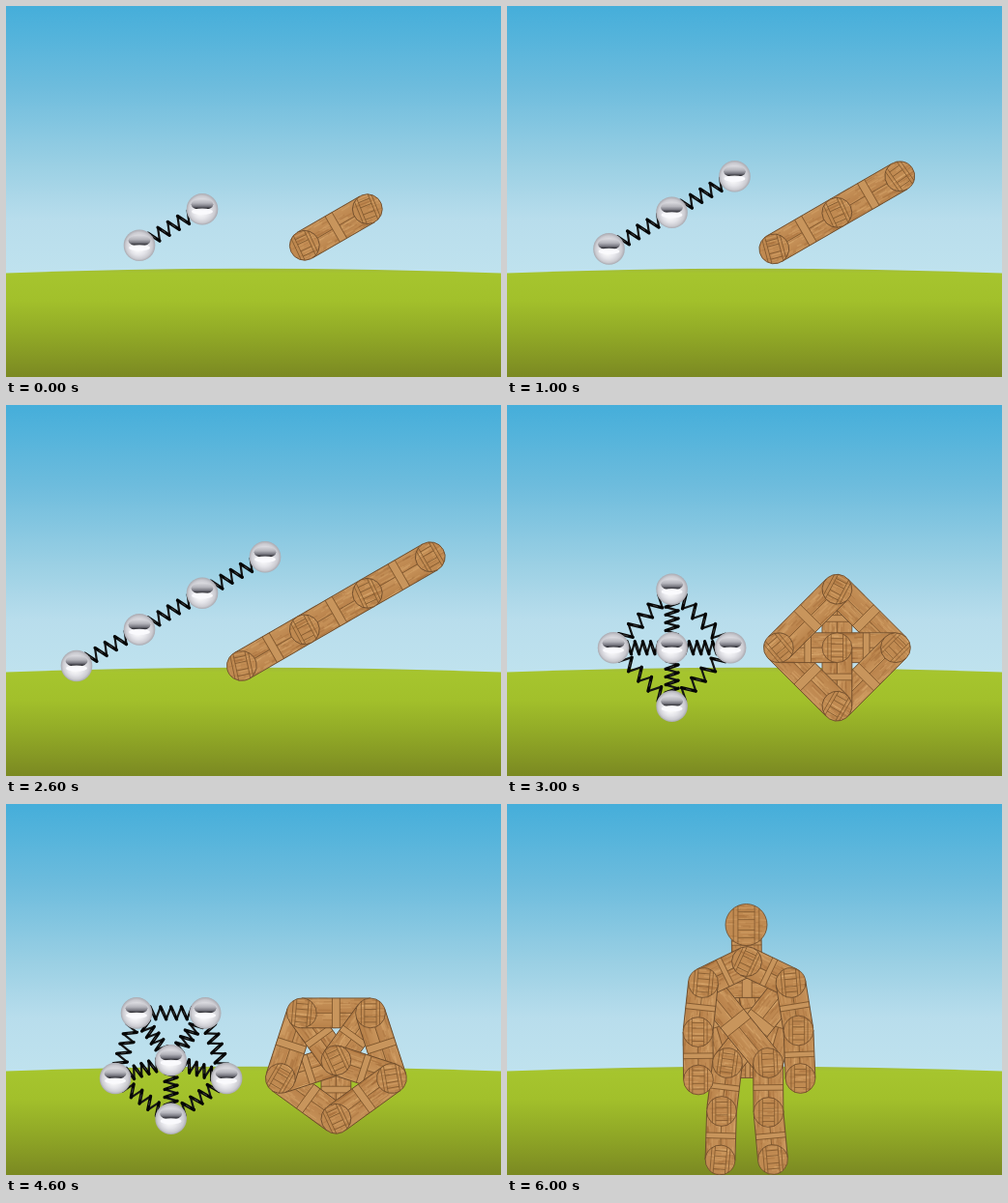
These frames come from a looping animation (512 by 384 pixels, 7 s). An HTML page with a canvas:

```html
<!DOCTYPE html>
<html lang="en">
<head>
<meta charset="utf-8">
<title>Springs and planks</title>
<style>
html, body { margin: 0; overflow: hidden; background: #b9deec; }
canvas { display: block; }
</style>
</head>
<body>
<canvas id="stage" width="512" height="384"></canvas>
<script>
const ctx = document.getElementById('stage').getContext('2d');
const RAD = Math.PI / 180, EDGE = '#6b4a2a', SEAM = '#82592f';

function seeded(seed) {
  return () => (seed = (seed * 16807) % 2147483647) / 2147483647;
}

function fade(gradient, ...colors) {
  for (const [at, color] of colors) gradient.addColorStop(at, color);
  return gradient;
}

function local(x, y, angle, draw) {
  ctx.save();
  ctx.translate(x, y);
  ctx.rotate(angle);
  draw();
  ctx.restore();
}

function strokeLine(x1, y1, x2, y2, color = SEAM, width = 0.9) {
  ctx.strokeStyle = color;
  ctx.lineWidth = width;
  ctx.beginPath();
  ctx.moveTo(x1, y1);
  ctx.lineTo(x2, y2);
  ctx.stroke();
}

function disc(r, fill, squash = 1, y = 0) {
  ctx.fillStyle = fill;
  ctx.beginPath();
  ctx.ellipse(0, y, r, r * squash, 0, 0, 7);
  ctx.fill();
}

// Streaks running along x
function grain(x, y, w, h, seed) {
  const random = seeded(seed);
  for (let i = 0; i < w * h / 30; i++) {
    const gx = x + random() * w, gy = y + random() * h, len = 5 + random() * 14;
    const color = random() < 0.5 ? 'rgba(140,88,42,.22)' : 'rgba(226,180,120,.3)';
    strokeLine(gx, gy, Math.min(x + w, gx + len), gy + random() - 0.5, color, 0.8 + random());
  }
}

function drawBackground() {
  ctx.fillStyle = fade(ctx.createLinearGradient(0, 0, 0, 276),
    [0, '#45aeda'], [0.3, '#6dbcdd'], [0.6, '#9bd0e4'], [0.8, '#b8ddec'], [1, '#bfe2ee']);
  ctx.fillRect(0, 0, 512, 384);
  ctx.fillStyle = fade(ctx.createLinearGradient(0, 271, 0, 384),
    [0, '#9fb83a'], [0.05, '#a6c52e'], [0.3, '#a2c02b'], [0.65, '#8fa626'], [1, '#7b8922']);
  ctx.beginPath();
  ctx.moveTo(0, 276.5);
  ctx.quadraticCurveTo(250, 267, 512, 276.5);
  ctx.lineTo(512, 384);
  ctx.lineTo(0, 384);
  ctx.fill();
}

function drawBall([x, y]) {
  const r = 16.3;
  local(x, y, 0, () => {
    disc(r, fade(ctx.createRadialGradient(-2, 2, 2, 0, 0, r),
      [0, '#fff'], [0.5, '#e4e4e9'], [0.82, '#cbcbd1'], [1, '#a9a9b0']));
    disc(11.5, fade(ctx.createLinearGradient(0, -11, 0, 1),
      [0, '#dcdce1'], [0.4, '#b4b4bb'], [0.68, '#777780'], [0.88, '#26262c'], [1, '#4a4a52']), 0.52, -5);
    disc(11, 'rgba(250,250,253,.95)', 0.28, 2.5);
  });
}

// A zigzag with heavy down strokes and lighter returns
function drawSpring([x1, y1], [x2, y2]) {
  const length = Math.hypot(x2 - x1, y2 - y1), start = 14, turns = 4;
  const pitch = (length - 2 * start) / turns, height = 6.5;
  local(x1, y1, Math.atan2(y2 - y1, x2 - x1), () => {
    ctx.lineCap = 'round';
    for (let i = 0; i < turns; i++) {
      const left = start + i * pitch, middle = left + pitch * 0.55;
      strokeLine(middle, height, left + pitch, -height, '#151515', 2.2);
      strokeLine(left, -height, middle, height, '#050505', 3.3);
      strokeLine(left + pitch * 0.2, -2, left + pitch * 0.36, 2, '#666', 0.6);
    }
  });
}

function drawPlank([x1, y1], [x2, y2], seed) {
  const length = Math.hypot(x2 - x1, y2 - y1), mid = length / 2, h = 15.4;
  const band = length * 0.055;
  local(x1, y1, Math.atan2(y2 - y1, x2 - x1), () => {
    ctx.fillStyle = fade(ctx.createLinearGradient(0, -h, 0, h),
      [0, '#c69259'], [0.48, '#ba834c'], [0.52, '#c8945b'], [1, '#b88149']);
    ctx.fillRect(0, -h, length, 2 * h);
    grain(0, -h, length, 2 * h, seed);
    strokeLine(0, 0, length, 0);
    ctx.fillStyle = '#c8955c';
    ctx.fillRect(mid - band, -h, 2 * band, 2 * h);
    for (const x of [mid - band, mid + band]) strokeLine(x, -h, x, h);
    for (const y of [-h, h]) strokeLine(0, y, length, y, EDGE);
  });
}

function drawJoint([x, y, tilt, r = 15.4], seed) {
  local(x, y, tilt * RAD, () => {
    const side = 0.62 * r;
    disc(r, '#c08a51');
    ctx.save();
    ctx.clip();
    grain(-r, -r, 2 * r, 2 * r, seed);
    for (const x of [-side, -0.4 * r, 0.4 * r, side]) strokeLine(x, -r, x, r, SEAM, 0.8);
    for (const row of [-0.62, -0.25, 0.25, 0.62]) strokeLine(-0.4 * r, row * r, 0.4 * r, row * r, SEAM, 0.8);
    ctx.restore();
    ctx.strokeStyle = EDGE;
    ctx.lineWidth = 0.8;
    ctx.beginPath();
    ctx.arc(0, 0, r, 0, 7);
    ctx.stroke();
  });
}

// Each chain or wheel is a list of [x, y, tilt] nodes and the links between them
function chain(cy, tilts) {
  const nodes = tilts.map((tilt, i) => {
    const k = i - (tilts.length - 1) / 2;
    return [170.5 + 65 * k, cy - 37.6 * k, tilt];
  });
  return { nodes, links: nodes.slice(1).map((_, i) => [i, i + 1]) };
}

function wheel(cy, firstAngle, [hubTilt, ...tilts]) {
  const n = tilts.length, links = [];
  const nodes = tilts.map((tilt, i) => {
    const a = (firstAngle + 360 * i / n) * RAD;
    links.push([i, n], [i, (i + 1) % n]);
    return [170.6 + 60.5 * Math.cos(a), cy + 60.5 * Math.sin(a), tilt];
  });
  return { nodes: [...nodes, [170.6, cy, hubTilt]], links };
}

const body = {
  nodes: [
    [247.5, 125, 0, 21.5], [248, 163, 25], [203, 185, 5], [293.5, 185, -5],
    [197.5, 236, 0], [301.5, 234.5, 0], [198, 285.5, 0], [303.5, 284, 0],
    [228, 268, 8], [270, 268, -3], [222, 318, 0], [270.5, 319, 0],
    [220.5, 368.5, 5], [275, 368, -5]
  ],
  links: [
    [1, 8], [1, 9], [2, 3], [8, 9], [2, 8], [3, 9], [3, 8], [2, 9], [0, 1], [1, 2], [1, 3],
    [2, 4], [3, 5], [4, 6], [5, 7], [8, 10], [9, 11], [10, 12], [11, 13]
  ]
};

const scenes = [
  chain(229, [-25, -22]),
  chain(213.8, [-15, -25, -35]),
  chain(213.6, [-12, -28, -25, -30]),
  wheel(251.2, -90, [0, 28, 45, 30, -40]),
  wheel(265.3, 90, [-25, -25, 30, 5, 0, -10]),
  wheel(241.5, -90, [-35, -35, 0, 0, 25, 20, 0])
];

function drawWood({ nodes, links }) {
  links.forEach(([a, b], i) => drawPlank(nodes[a], nodes[b], 917 * (i + 3)));
  nodes.forEach((node, i) => drawJoint(node, 1543 * (i + 2)));
}

function drawScene(index) {
  drawBackground();
  if (index === scenes.length) return drawWood(body);
  const { nodes, links } = scenes[index];
  for (const [a, b] of links) drawSpring(nodes[a], nodes[b]);
  nodes.forEach(drawBall);
  local(170.8, 0, 0, () => drawWood(scenes[index]));
}

let shown = -1;
function tick() {
  const index = Math.floor(performance.now() / 1000) % (scenes.length + 1);
  if (index !== shown) drawScene(shown = index);
  requestAnimationFrame(tick);
}
tick();
</script>
</body>
</html>
```
